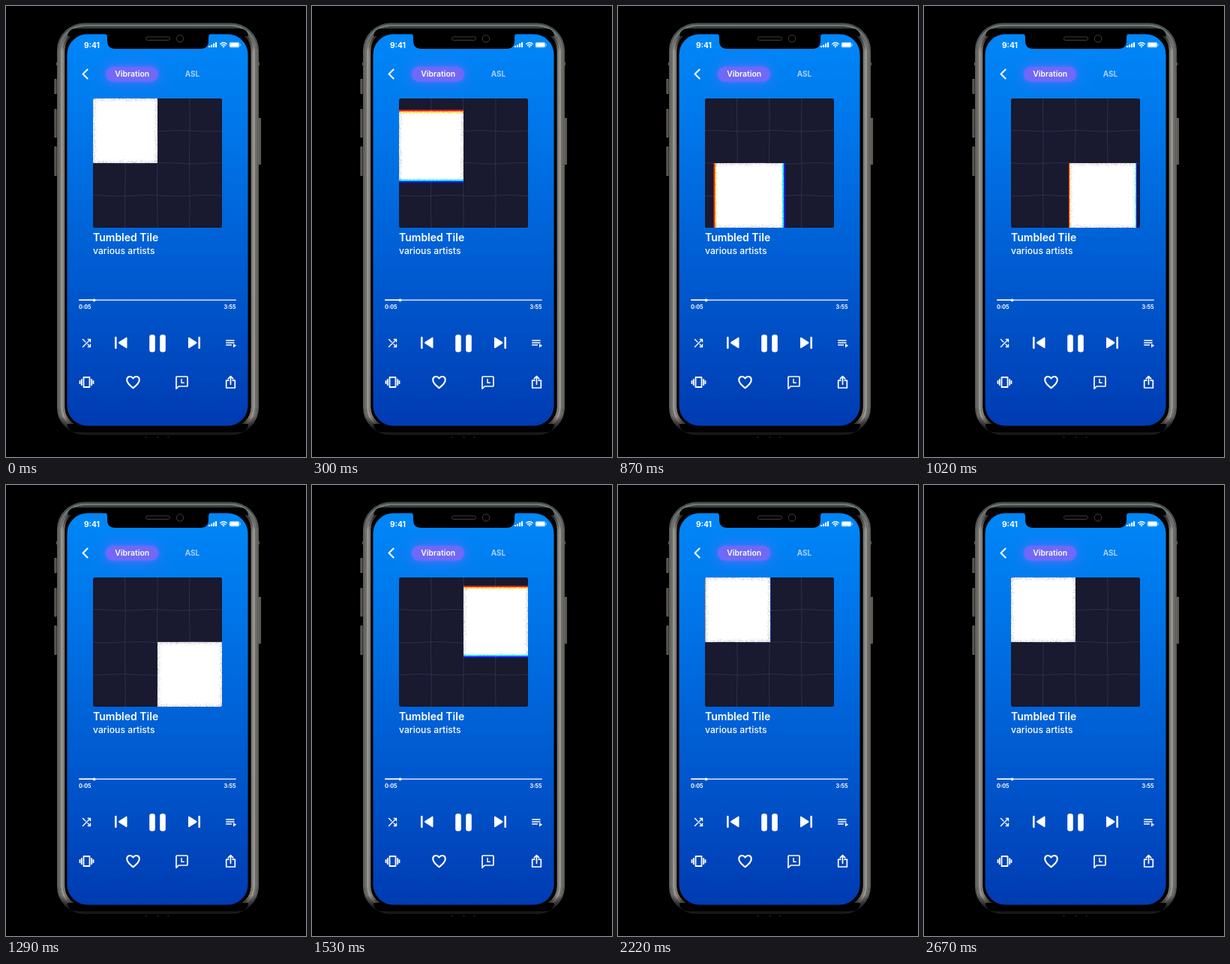
An HTML page with a canvas for the animation above (2700 ms loop, 400 px wide and 600 px high).

```html
<!DOCTYPE html>
<html lang="en">
<head>
<meta charset="utf-8">
<title>Music player</title>
<style>
html, body { margin: 0; width: 100%; height: 100%; overflow: hidden; background: #000; }
canvas { display: block; width: 400px; height: 600px; }
</style>
</head>
<body>
<canvas id="stage" width="400" height="600"></canvas>
<script>
const LOOP = 2700, STEP = 30, MOVE = 400, SHUTTER = 17;
const PANEL = { x: 116, y: 123, size: 172 };
const CELL = 86;
// Start time and direction of each slide.
const MOVES = [[145, 0, 1], [727, 1, 0], [1274, 0, -1], [1872, -1, 0]];

const canvas = document.getElementById('stage');
const backdrop = document.createElement('canvas');
backdrop.width = 400;
backdrop.height = 600;
let ctx = backdrop.getContext('2d');

function box(x, y, w, h, r, fill) {
  ctx.beginPath();
  ctx.roundRect(x, y, w, h, r);
  ctx.fillStyle = fill;
  ctx.fill();
}

function frame(inset, width, color) {
  ctx.beginPath();
  ctx.roundRect(68 + inset, 22.5 + inset, 269 - 2 * inset, 548 - 2 * inset, 37 - inset);
  ctx.strokeStyle = color;
  ctx.lineWidth = width;
  ctx.stroke();
}

function gradient(y0, y1, ...stops) {
  const g = ctx.createLinearGradient(0, y0, 0, y1);
  stops.forEach(([at, color]) => g.addColorStop(at, color));
  return g;
}

function path(d, width = 1.6, color = '#fff') {
  ctx.strokeStyle = color;
  ctx.lineWidth = width;
  ctx.lineCap = ctx.lineJoin = 'round';
  ctx.stroke(new Path2D(d));
}

function solid(d, color = '#fff') {
  ctx.fillStyle = color;
  ctx.fill(new Path2D(d));
}

function text(str, x, y, size, weight, color = '#fff', align = 'left') {
  ctx.font = `${weight} ${size}px Inter, sans-serif`;
  ctx.textAlign = align;
  ctx.fillStyle = color;
  ctx.fillText(str, x, y);
}

// A metal band that fades out along the top and bottom edges.
function metal(side, top, bottom) {
  return gradient(22, 571, [0, top], [.015, top], [.07, side], [.955, side], [.985, bottom], [1, bottom]);
}

function drawPhone() {
  ctx.fillStyle = '#000';
  ctx.fillRect(0, 0, 400, 600);
  for (const [x, y, h] of [[64.5, 97, 20], [64.5, 137, 38], [64.5, 187, 39], [337, 149, 62]]) {
    box(x, y, 3, h, 1, '#777570');
    box(x + 1.2, y + 1, 1, h - 2, 0, '#383633');
  }
  box(68, 22.5, 269, 548, 37, '#050505');
  frame(1, 2, metal('#5c5b57', '#46504f', '#1c1c1c'));
  frame(3.5, 3.2, metal('#6d6b67', '#6f7a78', '#161616'));
  frame(6.5, 3.2, metal('#96948e', '#35403f', '#080808'));
  frame(9.2, 2.8, metal('#7b7974', '#000', '#000'));
  frame(12, 3, '#000');
  // Bezel is thicker above and below the screen.
  box(82, 30, 241, 10, [26, 26, 0, 0], '#000');
  box(82, 556, 241, 11, [0, 0, 26, 26], '#000');
  for (const x of [67, 336]) box(x, 75, 2, 4, 0, '#5b5b58');
  for (const x of [185, 201, 215]) box(x, 573, 3, 1, 0, '#252525');

  box(81.5, 37.5, 241, 521, 27,
    gradient(38, 558, [0, '#0087f8'], [.3, '#0072e6'], [.65, '#0058ce'], [1, '#003bb2']));
  solid('M130 36H275Q270 36 270 42V46Q270 57 259 57H146Q135 57 135 46V42Q135 36 130 36Z', '#000');
  ctx.beginPath();
  ctx.roundRect(186.5, 41, 32, 4.5, 2.2);
  ctx.strokeStyle = '#3f3f3f';
  ctx.lineWidth = 1;
  ctx.stroke();
  ctx.beginPath();
  ctx.arc(232, 43.5, 4.7, 0, 7);
  ctx.stroke();
}

function drawStatus() {
  text('9:41', 104, 55.5, 10.2, 700);
  for (let i = 0; i < 4; i++) box(270 + i * 3, 53 - i * 1.6, 2.1, 2 + i * 1.6, .5, '#fff');
  path('M285.7 50.6Q290 46.8 294.3 50.6M287.4 52.6Q290 50.4 292.6 52.6', 1.3);
  solid('M288.4 53.8Q290 52.6 291.6 53.8L290 55.5Z');
  ctx.globalAlpha = .5;
  box(297.5, 48, 14, 7.5, 2.3, '#fff');
  box(312, 50.3, 1, 3, .5, '#fff');
  ctx.globalAlpha = 1;
  box(298.7, 49.2, 11.6, 5.1, 1.3, '#fff');
}

function drawTabs() {
  path('M108.6 84.5L102.6 90.5L108.6 96.5', 2.1);
  ctx.save();
  ctx.shadowColor = 'rgba(84, 112, 255, .9)';
  ctx.shadowBlur = 20;
  box(133, 81, 70, 19.5, 9.7, '#7069f7');
  ctx.shadowColor = '#6a6cfa';
  ctx.shadowBlur = 5;
  box(133.5, 81.5, 69, 18.5, 9.2, '#7069f7');
  ctx.restore();
  text('Vibration', 168.2, 94, 10.4, 600, '#fff', 'center');
  text('ASL', 248.5, 94, 10, 700, '#a9d0fc', 'center');
}

function drawControls() {
  text('Tumbled Tile', 116, 313, 14, 600);
  text('various artists', 116, 329.5, 12.2, 500);

  box(97, 390.5, 210, 1.6, .8, '#d5e4fa');
  box(97, 390.5, 20, 1.6, .8, '#fff');
  box(115.7, 389.5, 3.8, 3.8, 1.9, '#fff');
  text('0:05', 97, 402.8, 7.2, 700);
  text('3:55', 306.5, 402.8, 7.2, 700, '#fff', 'right');

  path('M102.5 443.5L106 447M109 450L112.5 453.5M109.3 443.5H112.5V446.7M112.5 443.5L102.5 453.5M112.5 450.3V453.5H109.3', 1.4);
  box(145, 440, 2.6, 16, 1, '#fff');
  solid('M160 441Q161.5 440 161.5 442V454Q161.5 456 160 455L150.5 449Q149.5 448 150.5 447Z');
  box(191.2, 437.3, 7.6, 23.2, 3, '#fff');
  box(205.2, 437.3, 7.6, 23.2, 3, '#fff');
  solid('M244.5 441Q243 440 243 442V454Q243 456 244.5 455L254 449Q255 448 254 447Z');
  box(256.4, 440, 2.6, 16, 1, '#fff');
  path('M293.7 445H304M293.7 448H304M293.7 451H300.5', 1.5);
  solid('M303 449.2L307.2 451.8L303 454.4Z');

  path('M103.5 494H111.5V507H103.5ZM100.8 496.8V504.2M114.2 496.8V504.2M98.5 498.8V502.2M116.5 498.8V502.2', 1.8);
  path('M169.5 508.3C164.5 504 161.2 501.3 161.2 497.4C161.2 492.5 167 491.3 169.5 495.4C172 491.3 177.8 492.5 177.8 497.4C177.8 501.3 174.5 504 169.5 508.3Z', 2);
  path('M227 509.2V494Q227 493 228 493H241Q242 493 242 494V505Q242 506 241 506H230.2Z', 1.7);
  path('M234 496.5V501.2H237.2', 1.5);
  path('M296.8 498.2H293.7V508H305.3V498.2H302.2M299.5 503.3V493M296.3 495.8L299.5 492.6L302.7 495.8', 1.7);
}

function ease(t) {
  t = Math.min(1, Math.max(0, t));
  return t < .5 ? 4 * t ** 3 : 1 - 4 * (1 - t) ** 3;
}

function position(time) {
  let x = PANEL.x, y = PANEL.y;
  for (const [start, dx, dy] of MOVES) {
    const p = ease((time - start) / MOVE) * CELL;
    x += dx * p;
    y += dy * p;
  }
  return { x, y };
}

function random(seed) {
  let s = seed * 7919 + 17;
  return () => {
    s = (s * 1664525 + 1013904223) % 4294967296;
    return s / 4294967296;
  };
}

function drawGrid(time) {
  box(PANEL.x, PANEL.y, PANEL.size, PANEL.size, 2.5, '#19192f');
  const phase = time / LOOP * 2 * Math.PI;
  ctx.strokeStyle = '#303253';
  ctx.lineWidth = .9;
  for (let i = 1; i < 4; i++) {
    const at = i * 43;
    ctx.beginPath();
    for (let d = 0; d <= PANEL.size; d += 4)
      ctx.lineTo(PANEL.x + d, PANEL.y + at + .3 + .7 * Math.sin(d * .08 + i * 1.7 + phase));
    ctx.stroke();
    ctx.beginPath();
    for (let d = 0; d <= PANEL.size; d += 4)
      ctx.lineTo(PANEL.x + at - .2 + .3 * Math.sin(d * .06 + i * 2 + phase), PANEL.y + d);
    ctx.stroke();
  }
}

// Speckles thin out from each edge towards the middle of the square.
function drawGrain(x, y, w, h, rand) {
  for (let side = 0; side < 4; side++) {
    const across = side < 2, length = across ? w : h;
    for (let along = 0; along < length; along++) {
      for (let depth = 0; depth < 6; depth++) {
        const fade = 1 - depth / 6;
        if (rand() > .75 * fade) continue;
        const offset = side % 2 ? (across ? h : w) - 1 - depth : depth;
        ctx.fillStyle = `rgba(80,76,80,${fade * (.05 + rand() * .28)})`;
        ctx.fillRect(x + (across ? along : offset), y + (across ? offset : along), 1, 1);
      }
    }
  }
}

function drawSquare(time) {
  const a = position(time - SHUTTER / 2), b = position(time + SHUTTER / 2);
  const x = Math.min(a.x, b.x), y = Math.min(a.y, b.y);
  const w = Math.abs(a.x - b.x) + CELL, h = Math.abs(a.y - b.y) + CELL;
  const shiftX = (w - CELL) * .33, shiftY = (h - CELL) * .33;
  ctx.save();
  ctx.beginPath();
  ctx.roundRect(PANEL.x, PANEL.y, PANEL.size, PANEL.size, 2.5);
  ctx.clip();
  ctx.globalCompositeOperation = 'lighter';
  ['#f00', '#0f0', '#00f'].forEach((color, i) => {
    ctx.fillStyle = color;
    ctx.fillRect(x + (i - 1) * shiftX, y + (i - 1) * shiftY, w, h);
  });
  ctx.restore();
  const seed = Math.floor(time / STEP) + 1;
  drawGrain(Math.round(x), Math.round(y), Math.round(w), Math.round(h), random(seed));
}

drawPhone();
drawStatus();
drawTabs();
drawControls();
ctx = canvas.getContext('2d');

const began = performance.now();
function render() {
  const time = (performance.now() - began) % LOOP;
  ctx.drawImage(backdrop, 0, 0);
  drawGrid(time);
  drawSquare(time);
  requestAnimationFrame(render);
}
render();
</script>
</body>
</html>
```
